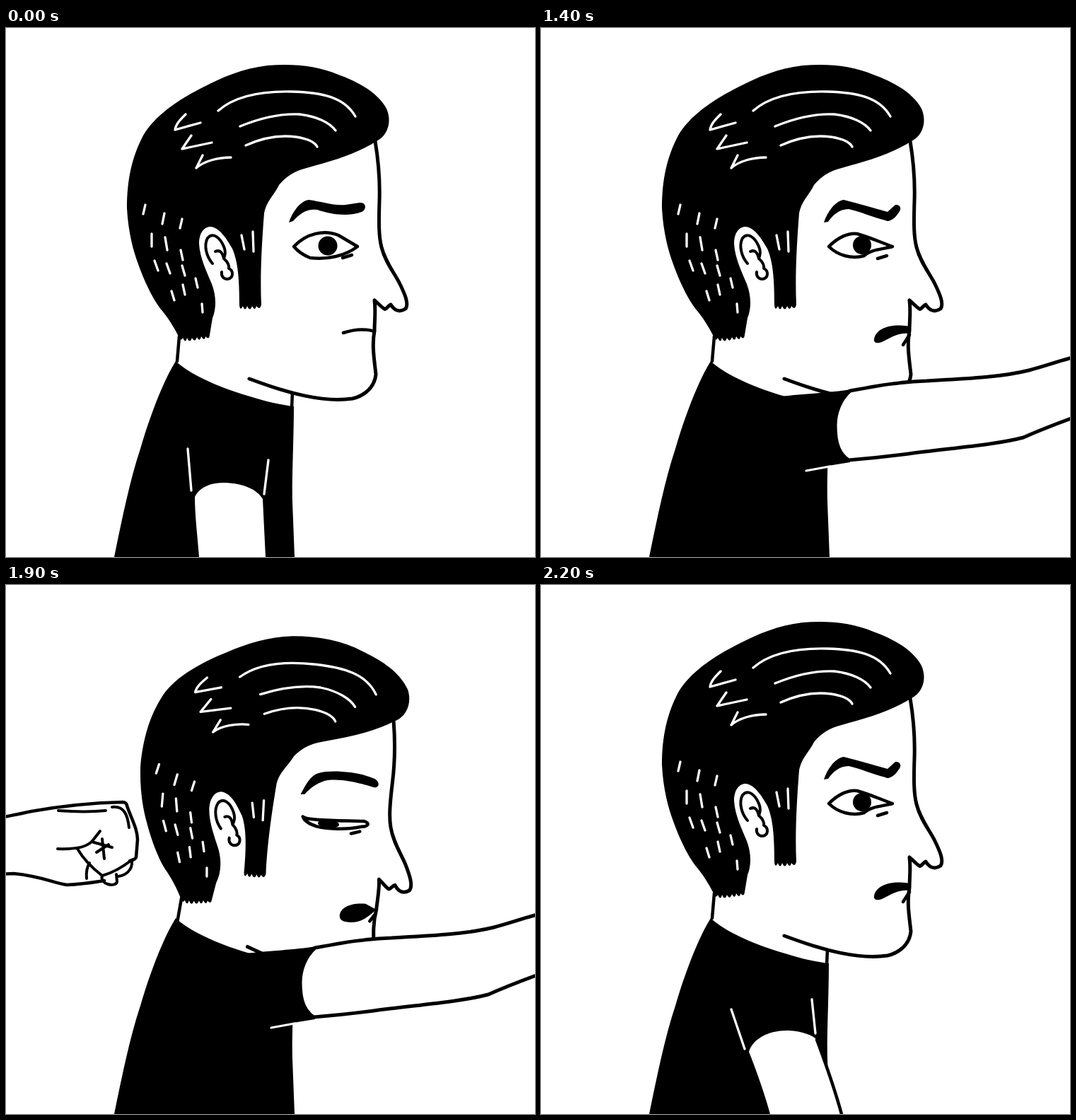
Animation of 748x748 px, one loop 2300 ms. Source, as an HTML page:

```html
<!DOCTYPE html>
<html lang="en">
<head>
<meta charset="utf-8">
<title>Punch</title>
<style>
html, body { margin: 0; height: 100%; overflow: hidden; background: #fff; }
svg { display: block; width: 100%; height: 100%; }
path { fill: none; stroke: #000; stroke-width: 4.5; stroke-linecap: round; stroke-linejoin: round; }
.ink { fill: #000; stroke: none; }
.bare { fill: #fff; stroke: none; }
.skin { fill: #fff; stroke-width: 5; }
.shine { stroke: #fff; stroke-width: 3.3; }
.thin { stroke-width: 4; }
[data-part] { display: none; }
</style>
</head>
<body>
<svg viewBox="0 0 748 748">
  <path d="M405,515L404,538"/>
  <g id="head">
    <path d="M245,436L242,471"/>
    <path class="skin" d="M522,160C527,190 529,215 528,245C527,275 527,295 531,310C536,330 548,345 556,360C564,376 570,390 565,397C556,403 549,399 544,391C540,393 537,399 535,397C530,394 525,388 521,385C523,400 521,415 521,428C517,450 521,470 523,490C521,508 507,520 490,524C450,530 400,517 344,496"/>
    <path class="ink" d="M524,160C540,152 546,132 538,114C525,90 495,75 470,66C440,53 405,50 370,53C335,57 305,70 280,83C250,98 212,121 194,152C178,182 171,215 171,255C173,290 180,315 187,334C198,365 212,390 221,400C233,415 240,428 245,438q3,5 5,0q4,9 6,0q4,9 7,0q4,8 7,-1q4,8 6,-1q5,8 6,0q5,6 6,-2L292,410C298,395 297,378 291,362C284,345 274,325 273,305C273,290 280,281 289,281C302,282 312,298 320,312C328,330 330,355 330,392q1,9 5,1q3,9 6,0q4,9 7,0q4,8 6,0q5,7 7,-2C359,350 362,300 365,262C368,245 380,235 386,222C396,210 408,202 425,198C460,188 492,180 524,160Z"/>
    <path class="shine" d="M300,117C325,95 365,89 405,90C445,91 478,97 494,125M331,139C365,125 395,121 415,122C440,125 458,134 466,145M339,166C370,152 395,152 410,154C430,157 437,162 440,168M254,122C246,130 240,136 239,144L275,134M262,152L249,171L291,162M278,180L269,198C280,188 300,183 318,183"/>
    <path class="shine" d="M197,250l-3,13M224,262l-3,15M249,270l-3,13M206,291v18M225,296l3,18M247,314l3,14M210,329l5,14M227,333l5,14M249,336l4,14M234,372l4,13M250,363l3,14M268,354l3,13M277,390l1,12M333,293l4,20M349,288l1,28"/>
    <path class="thin" d="M292,333C284,324 279,308 285,297C293,288 303,297 308,309C311,316 310,320 308,326C314,331 316,337 315,340C322,343 322,354 313,355C307,355 304,350 305,345M296,316C303,313 306,318 308,326"/>

    <path data-part="level" class="ink" d="M400,275C404,262 415,245 428,243C445,245 465,252 480,250L500,247C510,246 510,257 503,260C485,267 460,264 440,257C425,255 415,263 406,273Z"/>
    <path data-part="angry" class="ink" d="M400,275C404,262 415,245 428,243C445,247 475,256 490,260L501,250C508,249 511,256 505,262C500,270 492,275 487,272C470,268 450,259 435,256C422,256 412,265 406,274Z"/>
    <path data-part="raised" class="ink" d="M400,275C406,260 412,247 422,243C440,236 480,236 503,244C511,248 510,257 502,256C480,251 450,247 432,253C420,258 412,266 406,274Z"/>

    <g data-part="open">
      <path d="M407,309C425,290 450,285 470,293L497,309C480,322 455,328 430,325C420,321 412,315 407,309ZM476,325L489,321"/>
      <circle cx="455" cy="308" r="13.5"/>
    </g>
    <g data-part="glare">
      <path d="M407,309C420,296 435,289 447,291C465,296 480,303 497,309C483,313 466,313 457,322C440,327 420,322 407,309ZM476,326L489,322"/>
      <circle cx="454" cy="307" r="13"/>
    </g>
    <g data-part="wide">
      <path d="M407,308C420,288 440,283 460,287C480,292 492,302 498,309C482,325 465,328 447,325C430,322 412,314 407,308Z"/>
      <circle cx="455" cy="306" r="10.5"/>
    </g>
    <g data-part="half">
      <path d="M406,306C412,312 470,306 493,305C502,307 499,312 490,313C470,319 440,321 426,318C414,315 408,311 406,306ZM476,324L488,320"/>
      <ellipse cx="443" cy="313" rx="15" ry="6"/>
    </g>
    <path data-part="shut" d="M410,307C418,322 450,320 470,315L501,308M477,325L489,321"/>

    <path data-part="flat" d="M477,431C492,426 508,425 521,429"/>
    <g data-part="frown">
      <path class="ink" d="M471,440C473,425 495,417 522,422L522,432C505,430 495,438 482,444C474,447 470,444 471,440Z"/>
      <path d="M521,434L512,448"/>
    </g>
    <ellipse data-part="gape" cx="496" cy="436" rx="27" ry="16" transform="rotate(-15 496 436)"/>
    <g data-part="pout">
      <path class="ink" d="M470,441C470,428 486,421 505,421L521,428C513,436 503,448 487,449C476,450 470,447 470,441Z"/>
      <path d="M520,434L513,445"/>
    </g>
  </g>

  <path class="ink" d="M240,471C260,490 300,508 345,521C370,529 390,533 407,535C407,580 404,640 405,670L408,748H153C165,690 175,640 190,595C203,550 222,500 240,471Z"/>

  <g data-part="rest">
    <path class="bare" d="M273,748C271,720 267,690 267,663C275,648 290,643 310,643C335,644 355,652 363,666L367,748Z"/>
    <path class="shine" d="M257,595L262,654M371,611L365,659"/>
  </g>
  <g data-part="drop">
    <path class="bare" d="M324,748C315,715 302,680 294,660C300,640 325,629 350,630C370,631 385,637 390,643L424,748Z"/>
    <path d="M390,643C400,670 415,710 426,752"/>
    <path class="shine" d="M269,600L288,656M383,586L388,634"/>
  </g>
  <g data-part="swing">
    <path class="ink" d="M405,625L414,654L400,660Z"/>
    <path class="bare" d="M357,748L320,688C325,670 345,655 370,648C390,645 405,648 413,652L468,748Z"/>
    <path d="M407,632L414,651C435,685 450,715 469,751"/>
    <path class="shine" d="M284,636L315,686M393,598L402,623"/>
  </g>
  <g data-part="bend">
    <path class="ink" d="M400,560L432,580L400,610Z"/>
    <path class="skin" d="M432,580C500,603 560,630 613,655C630,620 660,590 676,553C677,530 676,500 682,478C688,465 700,460 716,458C722,447 732,437 752,434V545C730,575 710,630 690,665C670,705 645,735 622,746C600,750 570,740 545,730C500,710 440,688 407,680L381,668C370,635 390,595 432,580ZM716,457C705,470 695,485 690,500M752,453L741,458"/>
    <path class="shine" d="M379,551L401,564M321,651L377,669"/>
  </g>
  <g data-part="reach">
    <path class="ink" d="M340,521C370,517 410,516 437,511V614L400,620Z"/>
    <path class="skin" d="M437,513C480,505 510,500 545,499C600,496 650,494 690,484C712,478 732,471 755,465V550C722,562 702,570 682,579C645,589 580,594 520,602C490,606 460,609 435,611C423,603 416,590 416,562C416,545 423,525 437,513Z"/>
    <path class="shine" d="M375,626L408,620"/>
  </g>

  <g id="fist">
    <path class="bare" d="M-5,347C80,330 170,308 258,309C266,320 273,345 274,388L266,400L240,423L175,424C140,412 100,400 -5,432Z"/>
    <path stroke-width="5" d="M-5,347C30,338 80,330 125,320C170,312 210,308 254,307Q259,307 260,312C266,330 275,345 275,360L273,385Q271,389 264,390M-5,432C30,420 65,408 100,408C140,412 155,421 175,424C200,423 215,420 228,418"/>
    <path class="thin" d="M163,319C190,321 210,321 230,319M239,314C256,312 261,325 263,343M162,373C185,374 203,371 211,362L222,348M210,363L239,371M225,359L228,387M217,378L234,367M190,373C200,390 212,401 225,411C240,407 255,398 268,388M203,415C202,405 204,398 207,393M225,411C221,423 243,428 246,420L245,409M247,412C258,411 268,403 267,391"/>
  </g>
</svg>
<script>
// start ms, head [turn, x, y], visible parts, fist offset
const poses = [
  [0, [0, 0, 0], 'level open flat rest'],
  [1000, [0, 0, 0], 'angry glare frown swing'],
  [1300, [0, 0, 0], 'angry glare frown bend'],
  [1400, [0, 0, 0], 'angry glare frown reach'],
  [1500, [13, 112, -39.5], 'level wide gape reach', 0],
  [1800, [9, 75, -26], 'raised half pout reach', -36],
  [1900, [5, 42, -12.7], 'raised half pout reach', -89],
  [2000, [3.4, 29.5, -7.8], 'level shut frown bend'],
  [2100, [1.7, 15, -4], 'level half frown swing'],
  [2200, [0, 0, 0], 'angry glare frown drop']
];
const loop = 2300;
const head = document.getElementById('head');
const fist = document.getElementById('fist');
const parts = document.querySelectorAll('[data-part]');
const begin = performance.now();
let shown;

function show([, [turn, x, y], names, push]) {
  const on = names.split(' ');
  for (const p of parts) p.style.display = on.includes(p.dataset.part) ? 'inline' : 'none';
  head.setAttribute('transform', `translate(${x} ${y}) rotate(${turn})`);
  fist.style.display = push === undefined ? 'none' : 'inline';
  fist.setAttribute('transform', `translate(${push || 0} 0)`);
}

function tick() {
  const t = (performance.now() - begin) % loop;
  const pose = poses.findLast(p => p[0] <= t);
  if (pose !== shown) show(shown = pose);
  requestAnimationFrame(tick);
}
tick();
</script>
</body>
</html>
```
